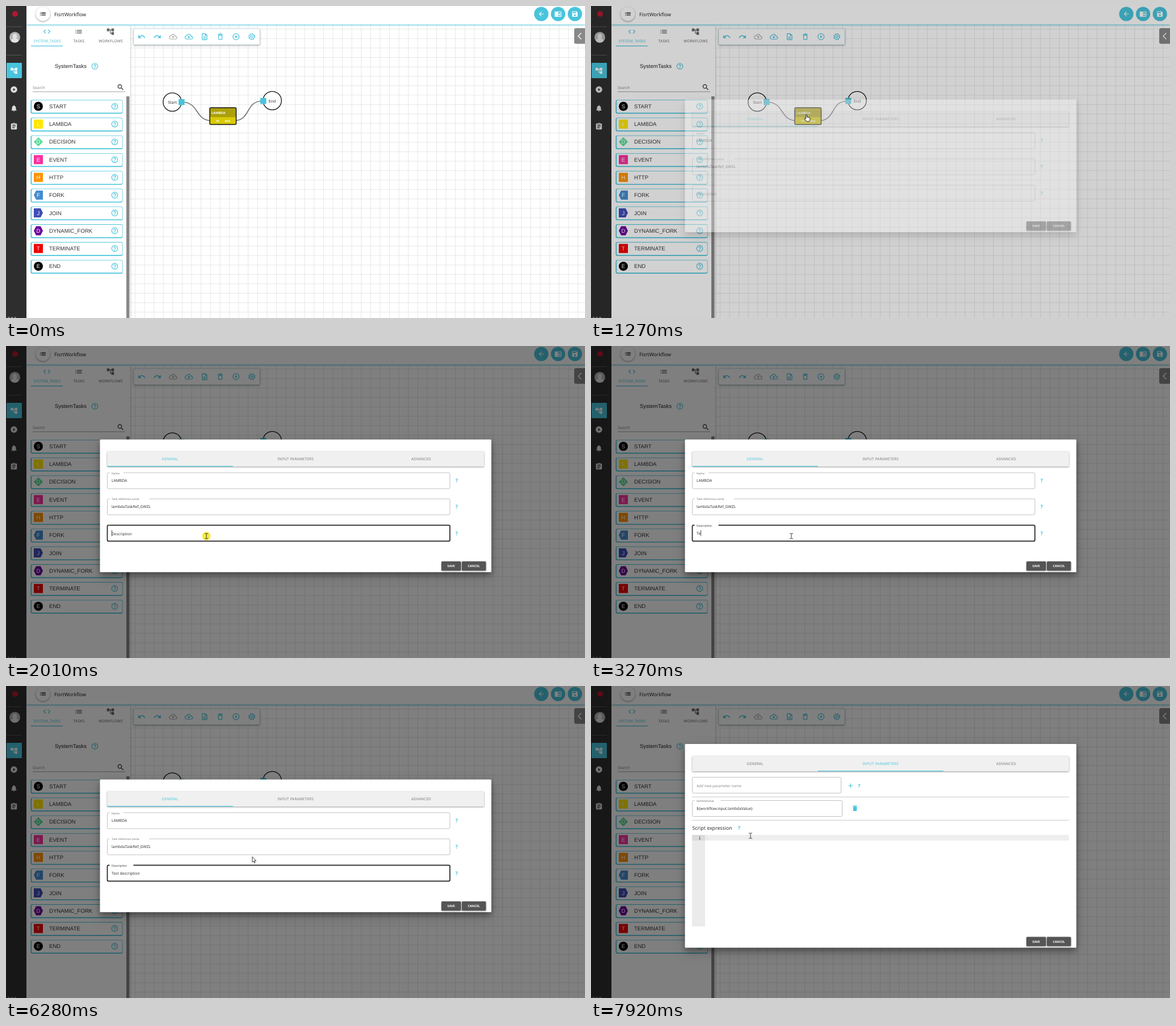
Write an HTML page that moves like this. It is 1020 by 549 pixels and loops after 7990 ms.

```html
<!DOCTYPE html>
<html lang="en">
<head>
<meta charset="utf-8">
<title>Workflow editor</title>
<style>
  html, body { margin: 0; width: 100%; height: 100%; overflow: hidden; background: #fff; }
  svg { display: block; width: 100vw; height: 100vh; }
  text { font-family: "Noto Sans", sans-serif; text-rendering: geometricPrecision; white-space: pre; }
  .arial { font-family: "Liberation Sans", Arial, sans-serif; }
  .mono { font-family: "DejaVu Sans Mono", monospace; }
  .mid { text-anchor: middle; }
  .caps { letter-spacing: .0286em; }
  .medium { font-weight: 500; }
  .semi { font-weight: 600; }
  .bold { font-weight: 700; }
  .field { fill: none; stroke: #bababa; stroke-width: .9; }
  .field.hover { stroke: #333; }
  .field.focus { stroke: #222; stroke-width: 1.7; }
  .soft { filter: drop-shadow(0 1px 1.5px rgba(0,0,0,.4)); }
  .deep { filter: drop-shadow(0 5px 5px rgba(0,0,0,.3)) drop-shadow(0 7px 10px rgba(0,0,0,.18)); }
  .glow { filter: drop-shadow(0 1.5px 1.8px #48c4dc); }
</style>
</head>
<body>
<svg id="stage" viewBox="0 0 1020 549" preserveAspectRatio="none"></svg>
<script>
const LOOP = 7990, STEP = 66.6;
const CYAN = '#48c4dc', INK = '#333', GREY = '#888';

const RING = 'M12 2a10 10 0 1 0 0 20 10 10 0 0 0 0-20z';
const HOLE = 'M12 4a8 8 0 1 0 0 16 8 8 0 0 0 0-16z';
const CLOUD = 'M19.35 10.04C18.67 6.59 15.64 4 12 4 9.11 4 6.6 5.64 5.35 8.04 2.34 8.36 0 10.91 0 14c0 3.31 2.69 6 6 6h13c2.76 0 5-2.24 5-5 0-2.64-2.05-4.78-4.65-4.96zM19 18H6c-2.21 0-4-1.79-4-4 0-2.05 1.53-3.76 3.56-3.97l1.07-.11.5-.95C8.08 7.14 9.94 6 12 6c2.62 0 4.88 1.86 5.39 4.43l.3 1.5 1.53.11c1.56.1 2.78 1.41 2.78 2.96 0 1.65-1.35 3-3 3z';
const BIN = 'M6 19c0 1.1.9 2 2 2h8c1.1 0 2-.9 2-2V7H6zM15.5 4l-1-1h-5l-1 1H5v2h14V4z';
const ICONS = {
  back: 'M20 11H7.83l5.59-5.59L12 4l-8 8 8 8 1.41-1.41L7.83 13H20z',
  book: 'M13 12h7v1.5h-7zm0-2.5h7V11h-7zm0 5h7V16h-7zM21 4H3c-1.1 0-2 .9-2 2v13c0 1.1.9 2 2 2h18c1.1 0 2-.9 2-2V6c0-1.1-.9-2-2-2zm0 15h-9V6h9z',
  save: 'M17 3H5a2 2 0 0 0-2 2v14c0 1.1.89 2 2 2h14c1.1 0 2-.9 2-2V7zm-5 16a3 3 0 1 1 0-6 3 3 0 0 1 0 6zm3-10H5V5h10z',
  list: 'M3 11h2v2H3zm0 4h2v2H3zm0-8h2v2H3zm4 4h14v2H7zm0 4h14v2H7zM7 7h14v2H7z',
  code: 'M9.4 16.6L4.8 12l4.6-4.6L8 6l-6 6 6 6zm5.2 0l4.6-4.6-4.6-4.6L16 6l6 6-6 6z',
  tree: 'M22 11V3h-7v3H9V3H2v8h7V8h2v10h4v3h7v-8h-7v3h-2V8h2v3z',
  play: RING + 'M10 16.5v-9l6 4.5z',
  run: RING + HOLE + 'M10 16.5v-9l6 4.5z',
  bell: 'M12 22c1.1 0 2-.9 2-2h-4c0 1.1.89 2 2 2zm6-6v-5c0-3.07-1.64-5.64-4.5-6.32V4a1.5 1.5 0 0 0-3 0v.68C7.63 5.36 6 7.92 6 11v5l-2 2v1h16v-1z',
  clip: 'M19 3h-4.18a3 3 0 0 0-5.64 0H5c-1.1 0-2 .9-2 2v14c0 1.1.9 2 2 2h14c1.1 0 2-.9 2-2V5c0-1.1-.9-2-2-2zm-7 0a1 1 0 1 1 0 2 1 1 0 0 1 0-2zm2 14H7v-2h7zm3-4H7v-2h10zm0-4H7V7h10z',
  undo: 'M12.5 8c-2.65 0-5.05.99-6.9 2.6L2 7v9h9l-3.62-3.62c1.39-1.16 3.16-1.88 5.12-1.88 3.54 0 6.55 2.31 7.6 5.5l2.37-.78C21.08 11.03 17.15 8 12.5 8z',
  redo: 'M11.5 8c2.65 0 5.05.99 6.9 2.6L22 7v9h-9l3.62-3.62c-1.39-1.16-3.16-1.88-5.12-1.88-3.54 0-6.55 2.31-7.6 5.5l-2.37-.78C2.92 11.03 6.85 8 11.5 8z',
  upload: CLOUD + 'M8 13h2.55v3h2.9v-3H16l-4-4z',
  download: CLOUD + 'M13.45 10h-2.9v3H8l4 4 4-4h-2.55z',
  file: 'M8 16h8v2H8zm0-4h8v2H8zm6-10H6c-1.1 0-2 .9-2 2v16c0 1.1.89 2 2 2h12c1.1 0 2-.9 2-2V8zm4 18H6V4h7v5h5z',
  bin: BIN,
  binLine: BIN + 'M8 9h8v10H8z',
  help: RING + HOLE + 'M11 18h2v-2h-2zM12 6a4 4 0 0 0-4 4h2a2 2 0 1 1 4 0c0 2-3 1.75-3 5h2c0-2.25 3-2.5 3-5a4 4 0 0 0-4-4z',
  find: 'M15.5 14h-.79l-.28-.27a6.5 6.5 0 1 0-.7.7l.27.28v.79l5 4.99L20.49 19zm-6 0a4.5 4.5 0 1 1 0-9 4.5 4.5 0 0 1 0 9z'
};

const text = (x, y, s, size, fill = INK, cls = '', id = '') =>
  `<text id="${id}" x="${x}" y="${y + size * .36}" font-size="${size}" fill="${fill}" class="${cls}">${s}</text>`;
const rect = (x, y, w, h, fill, more = '') =>
  `<rect x="${x}" y="${y}" width="${w}" height="${h}" fill="${fill}" ${more}/>`;
const disc = (x, y, r, fill, more = '') =>
  `<circle cx="${x}" cy="${y}" r="${r}" fill="${fill}" ${more}/>`;
const line = (d, stroke, w = 1) =>
  `<path d="${d}" fill="none" stroke="${stroke}" stroke-width="${w}"/>`;
const icon = (name, x, y, size, fill = CYAN) =>
  `<path d="${ICONS[name]}" fill="${fill}" fill-rule="evenodd" transform="translate(${x - size / 2} ${y - size / 2}) scale(${size / 24})"/>`;
// Outlined box whose top edge is open from x+4 to x+gap
const outline = (x, y, w, gap, h = 28) =>
  `M${x + gap} ${y}H${x + w - 2}q2 0 2 2V${y + h - 2}q0 2-2 2H${x + 2}q-2 0-2-2V${y + 2}q0-2 2-2H${x + 4}`;
const field = (id, x, y, w, gap) => `<path id="${id}" class="field" d="${outline(x, y, w, gap)}"/>`;
const ask = (x, y) => text(x, y, '?', 9, CYAN, 'mid bold');

function sideBar() {
  return rect(0, 0, 36, 549, '#2e2e2e') +
    disc(16, 14, 5, '#b5182f') +
    line('M1 36.5H28M1 86.5H28', '#555') +
    disc(15.5, 55, 9.5, '#b4b4b4') +
    `<path d="M9 62q0-4.5 4.5-5a4 4.500 0 1 1 4 0q4.5.5 4.5 5a9.5 9.5 0 0 1-13 0z" fill="#e2e2e2"/>` +
    rect(1, 100, 27, 27, CYAN, 'rx="1"') +
    icon('tree', 14, 114, 14, '#fff') + icon('play', 14, 147, 14, '#ddd') +
    icon('bell', 14, 180, 14, '#ddd') + icon('clip', 14, 212, 14, '#ddd') +
    text(3, 550, '0.0.0', 6.7, '#fff');
}

function header() {
  return rect(36, 0, 984, 32.5, '#fff', 'class="glow"') +
    disc(65, 14, 12.5, '#fff', 'class="soft"') + icon('list', 65, 14, 13, '#222') +
    text(85, 14.5, 'FisrtWorkflow', 8.7, '#222', 'medium') +
    ['back', 'book', 'save'].map((n, i) =>
      disc(943 + 29.6 * i, 14, 12.6, CYAN) + icon(n, 943 + 29.6 * i, 14, 13, '#fff')).join('');
}

function taskPanel() {
  const square = '-8,-8 8,-8 8,8 -8,8';
  const items = [
    ['START', '#000'], ['LAMBDA', '#ffe600', square], ['DECISION', '#55dc96', '0,-8 8,0 0,8 -8,0'],
    ['EVENT', '#f9309f', square], ['HTTP', '#ff9200', square], ['FORK', '#438bd0', '-8,0 -4,-8 8,-8 8,8 -4,8'],
    ['JOIN', '#3f4db8', '-8,-8 4,-8 8,0 4,8 -8,8'], ['DYNAMIC_FORK', '#6c0499', '-8,0 -4,-8 4,-8 8,0 4,8 -4,8'],
    ['TERMINATE', '#f00000', square], ['END', '#000']
  ];
  const tabs = [['code', 'SYSTEM_TASKS', CYAN], ['list', 'TASKS', '#666'], ['tree', 'WORKFLOWS', '#666']];
  return rect(36, 34, 183, 515, '#fff', 'class="soft"') +
    tabs.map(([n, s, c], i) =>
      icon(n, 72 + 56 * i, 45, 15, c) + text(72.5 + 56 * i, 61.5, s, 6.6, c, 'mid caps')).join('') +
    rect(44, 69.8, 56, 1.2, CYAN) +
    text(86, 106, 'SystemTasks', 9.5, '#222', 'arial') + icon('help', 156.5, 106, 14) +
    text(47, 144, 'Search', 6.8, GREY) + icon('find', 202, 143, 14, '#222') +
    rect(47, 150.5, 163, .8, GREY) +
    rect(212, 159, 5.5, 390, GREY) +
    items.map(([s, c, pts], i) => {
      const y = 176.5 + 31.27 * i;
      return rect(43.5, y - 11.3, 162, 24.3, CYAN, 'rx="3"') + rect(45.2, y - 10.5, 159.6, 21.8, '#fff', 'rx="2"') +
        (pts ? `<polygon points="${pts}" fill="${c}" transform="translate(57 ${y})"/>` : disc(57, y, 8, c)) +
        text(57, y, s[0], 9.6, '#fff', 'arial mid') + text(76, y, s, 9.6, INK, 'arial') + icon('help', 191.5, y, 14);
    }).join('');
}

function canvas() {
  const tools = ['undo', 'redo', 'upload', 'download', 'file', 'binLine', 'run'];
  const ring = (r, w, dash = 'none') =>
    disc(433, 54, r, 'none', `stroke="${CYAN}" stroke-width="${w}" stroke-dasharray="${dash}"`);
  const terminal = (x, y, s) =>
    disc(x, y, 16.2, '#fff', 'stroke="#111" stroke-width="1.3"') + text(x, y + .5, s, 7, INK, 'mid');
  return `<pattern id="grid" x="226.9" y="40.2" width="16.6" height="16.6" patternUnits="userSpaceOnUse">${line('M.5 0V17M0 .5H17', '#e2e2e2', .8)}</pattern>` +
    rect(219, 32, 801, 517, '#fff') + rect(219, 32, 801, 517, 'url(#grid)') +
    rect(225, 40, 222, 28, '#fff', 'rx="1.5" stroke="#bfe3ea" stroke-width=".7" class="soft"') +
    tools.map((n, i) => icon(n, 239 + 27.7 * i, 54, 14.5, n === 'upload' ? '#aaa' : CYAN)).join('') +
    ring(1.8, 1.1) + ring(4.2, 1.1) + ring(5.3, 1.5, 2.08) +
    rect(1001, 39, 24, 27.5, GREY, 'rx="3"') + line('M1013.5 47.5L1008 53l5.5 5.5', '#fff', 1.4) +
    line('M309 169C342 169 331 202 364 202M400 202C433 202 420 167 453 167', '#777', 1.7) +
    terminal(293, 169, 'Start') + terminal(469, 166.5, 'End') +
    rect(304, 163.8, 10.5, 10.5, CYAN) + rect(448, 161.8, 10.5, 10.5, CYAN) +
    rect(359, 179, 46.5, 29.5, '#d8ca06', 'rx="2"') + rect(359, 179, 46.5, 16.5, '#aca00a', 'rx="2"') +
    rect(359, 179, 46.5, 29.5, 'none', 'id="node" rx="2" stroke="#111" stroke-width="1.5"') +
    text(362, 188, 'LAMBDA', 5.7, '#fff', 'bold') + text(370, 202.3, 'in', 5.7, '#fff', 'bold') +
    text(385.5, 202.3, 'out', 5.7, '#fff', 'bold');
}

function dialog() {
  const tabs = ['GENERAL', 'INPUT PARAMETERS', 'ADVANCED'];
  const button = (x, w, s) =>
    rect(x, 379, w, 16.3, '#555', 'rx="1.5" class="soft"') + text(x + w / 2, 387.3, s, 5.5, '#fff', 'mid semi');
  const general =
    field('name', 178.5, 223, 603.5, 28.5) + text(186, 224, 'Name', 5, '#777') +
    text(186, 237, 'LAMBDA', 6.7) + ask(794, 237) +
    field('ref', 178.5, 269, 603.5, 73.5) + text(186, 269.5, 'Task reference name', 5, '#777') +
    text(186, 283, 'lambdaTaskRef_GWZL', 6.7) + ask(794, 283) +
    field('desc', 178.5, 315.3, 603.5, 4) + text(186, 331, 'Description', 6.7, '#777', '', 'label') +
    text(186, 329.3, '', 6.7, INK, '', 'typed') + ask(794, 329.5) +
    rect(186, 324, .8, 10.5, '#222', 'id="caret"');
  const params =
    field('add', 178.5, 160.5, 262, 4) + text(186, 176, 'Add new parameter name', 6.45, GREY) +
    line('M453.5 175.5H461M457.25 171.7V179.3', CYAN, 1.2) + ask(472.5, 175.5) +
    rect(178, 194.8, 664, .8, '#bbb') +
    field('value', 178.5, 201.5, 264, 50) + text(186, 202.3, 'lambdaValue', 5, '#777') +
    text(186, 215.5, '${workflow.input.lambdaValue}', 6.7) + icon('bin', 465, 215, 13) +
    rect(178, 235.8, 664, .8, '#bbb') +
    text(178.5, 250, 'Script expression', 8.75) + ask(261, 250) +
    rect(178, 262, 23, 161, '#ebebeb') + rect(178, 262, 23, 10, '#dadada') + rect(201, 262, 641, 10, '#eee') +
    text(189.5, 267.2, '1', 6.7, INK, 'mono') + rect(203.5, 262, .7, 10, '#ddd');
  return rect(165.5, 164.5, 689.5, 233.5, '#fff', 'id="paper" rx="1.5" class="deep"') +
    '<g id="tabs">' + rect(178.5, 185.5, 663.5, 26.5, '#f0f0f0', 'class="soft"') +
    tabs.map((s, i) => text(289 + 221.2 * i, 199, s, 6.4, '#777', 'mid caps', 'tab' + i)).join('') +
    rect(178.5, 211, 221.2, 1.2, CYAN, 'id="bar"') + '</g>' +
    `<g id="general">${general}</g><g id="params">${params}</g>` +
    '<g id="buttons">' + button(767, 34.5, 'SAVE') + button(803, 42.5, 'CANCEL') + '</g>';
}

const pointer = `<g id="cursor">
  <circle id="click" r="7.5" fill="#f2e41c" fill-opacity=".8"/>
  <path id="arrow" d="M0 0V9.5L2.2 7.5 3.7 11 5.2 10.3 3.7 7H6.7z" fill="#fff" stroke="#111" stroke-width=".8"/>
  <path id="hand" d="M-1 1a1 1 0 0 1 2 0V4.5l4.5.9q1.2.3 1 1.6l-.6 3.5q-.2 1.5-1.2 1.5H.8q-.7 0-1.1-.7L-3.8 7q.7-1.3 1.9-.3l.9.8z" fill="#fff" stroke="#111" stroke-width=".9"/>
  <path id="beam" d="M-3-4.5H-.6L0-4 .6-4.5H3M-3 4.5H-.6L0 4 .6 4.5H3M0-4V4" fill="none" stroke="#222" stroke-width=".9"/>
</g>`;

document.getElementById('stage').innerHTML = canvas() + taskPanel() + header() + sideBar() +
  rect(0, 0, 1020, 549, '#000', 'id="shade"') + `<g id="dialog">${dialog()}</g>` + pointer;

const $ = id => document.getElementById(id);
const set = (id, attrs) => { for (const k in attrs) $(id).setAttribute(k, attrs[k]); };
const show = (id, on) => set(id, { visibility: on ? 'visible' : 'hidden' });
const clamp = v => Math.max(0, Math.min(1, v));
const ease = v => v * v * (3 - 2 * v);

// Interpolates rows of [time, ...values]
function along(keys, t) {
  const i = keys.findIndex(k => k[0] > t);
  if (i < 0) return keys[keys.length - 1].slice(1);
  if (!i) return keys[0].slice(1);
  const a = keys[i - 1], b = keys[i], f = (t - a[0]) / (b[0] - a[0]);
  return a.slice(1).map((v, j) => v + (b[j + 1] - v) * f);
}

const PATH = [
  [130, 927, 516], [200, 860, 470], [270, 740, 390], [340, 600, 300], [400, 480, 230], [470, 400, 190],
  [535, 370, 177], [630, 379.5, 191], [1400, 379.5, 191], [1470, 379, 205], [1600, 372, 262], [1730, 358, 315],
  [1800, 354, 327], [1870, 353, 334.5], [5900, 353, 334.5], [5990, 430, 307], [6200, 430, 307], [6450, 446, 280],
  [6700, 480, 235], [6960, 500.5, 201.5], [7220, 500.5, 201.5], [7400, 440, 215], [7600, 330, 250],
  [7780, 284, 264], [7850, 281, 263.5]
];
const FADE = [[1200, 0], [1270, .39], [1330, .93], [1400, 1]];
const CLICKS = [[860, 920], [1060, 1130], [2000, 2140], [7030, 7170]];
const PHRASE = 'Test description';
const KEYS = [3140, 3270, 3470, 3600, 3670, 3930, 4000, 4200, 4400, 4600, 4730, 4930, 5130, 5200, 5260, 5470];
const FOCUS = 2000, BLUR = 7030, SWITCH = 7170, BLINK = 515;
const BOXES = { name: [223, 251, 782], ref: [269, 297, 782], desc: [315, 343, 782], add: [160, 188, 440], value: [201, 229, 442] };

function draw(time) {
  const q = Math.floor((time + 4) / STEP) * STEP;
  const [x, y] = along(PATH, q), [fade] = along(FADE, q);
  const open = fade > 0, second = time >= SWITCH, focused = time >= FOCUS && time < BLUR;

  set('shade', { opacity: fade * .5 });
  set('dialog', { opacity: fade });
  set('node', { stroke: time >= 860 && time < 920 ? '#4a4500' : '#111' });

  // Dialog layout for the current tab
  set('paper', { y: second ? 102 : 164.5, height: second ? 358.5 : 233.5 });
  set('tabs', { transform: `translate(0 ${second ? -62 : 0})` });
  set('buttons', { transform: `translate(0 ${second ? 62.5 : 0})` });
  $('general').style.display = second ? 'none' : '';
  $('params').style.display = second ? '' : 'none';
  set('bar', { x: 178.5 + 221.2 * ease(clamp((q - SWITCH) / 300)) });
  [0, 1].forEach(i => set('tab' + i, { fill: second === !!i ? CYAN : '#777' }));

  // Description field
  const lift = ease(clamp((time - FOCUS) / 200)), size = 6.7 - 1.7 * lift;
  const count = KEYS.filter(k => k <= time).length;
  set('label', { y: 331 - 15 * lift + size * .36, 'font-size': size, fill: focused ? '#333' : '#777' });
  set('desc', { d: outline(178.5, 315.3, 603.5, 4 + 42 * lift) });
  $('typed').textContent = PHRASE.slice(0, count);
  const last = count ? KEYS[count - 1] : FOCUS;
  $('caret').style.display = focused && Math.floor((time - last) / BLINK) % 2 === 0 ? '' : 'none';
  set('caret', { x: 186 + (count ? $('typed').getComputedTextLength() : 0) });

  // Hover and pointer shape
  let kind = 'arrow';
  for (const id in BOXES) {
    const [top, bottom, right] = BOXES[id];
    const live = open && second === (id === 'add' || id === 'value');
    const over = live && x > 178 && x < right && y > top && y < bottom;
    if (over) kind = 'beam';
    set(id, { class: 'field' + (id === 'desc' && focused ? ' focus' : over ? ' hover' : '') });
  }
  const bar = second ? 123 : 185;
  if (open ? y > bar && y < bar + 27 : x > 359 && x < 405 && y > 179 && y < 208) kind = 'hand';
  if (second && y > 262 && y < 423) kind = 'beam';

  const shown = time >= 130;
  set('cursor', { transform: `translate(${x} ${y})` });
  ['arrow', 'hand', 'beam'].forEach(k => show(k, shown && k === kind));
  show('click', CLICKS.some(([a, b]) => time >= a && time < b));
}

const start = performance.now();
function tick() {
  draw((performance.now() - start) % LOOP);
  requestAnimationFrame(tick);
}
tick();
</script>
</body>
</html>
```
